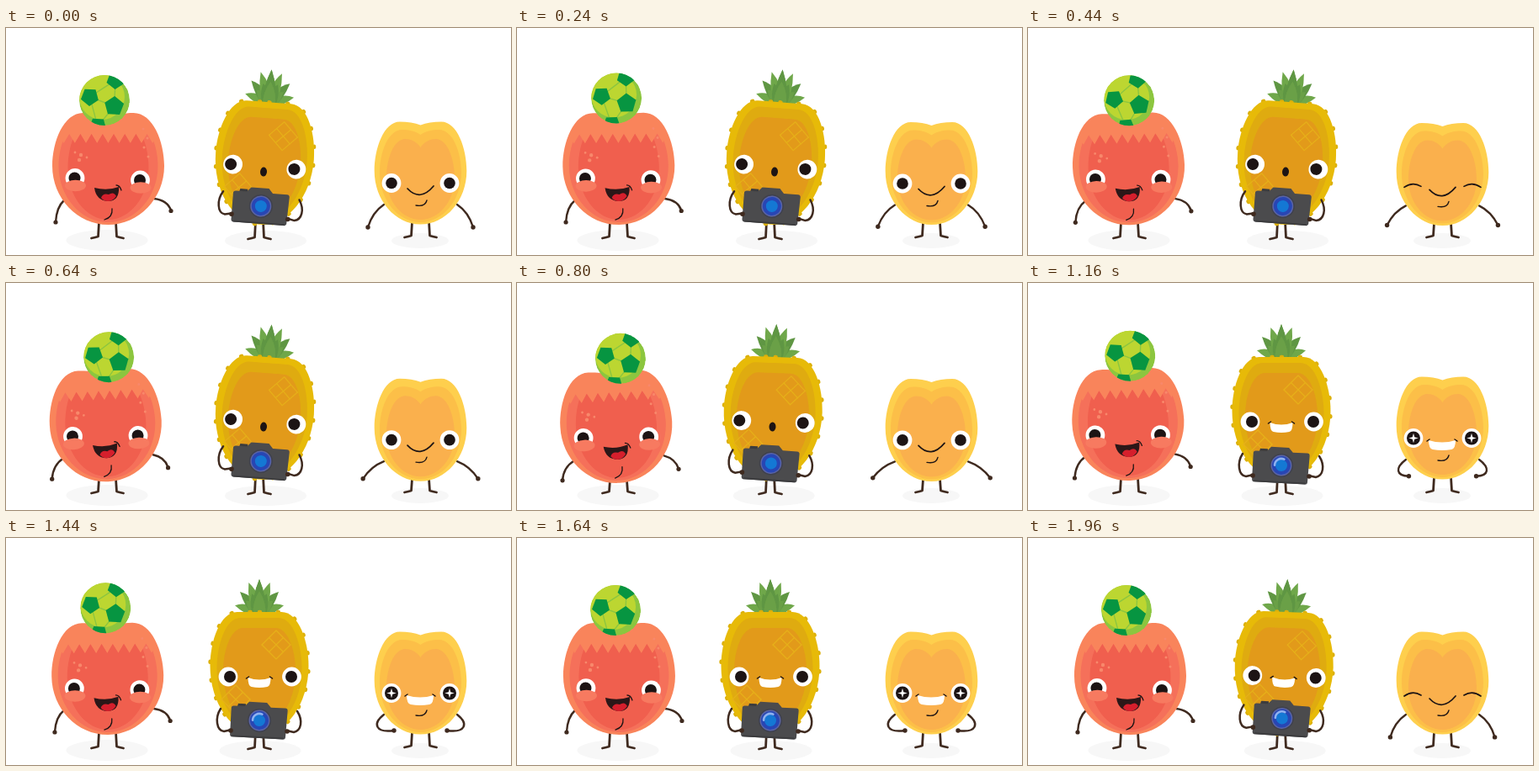
Animation of 600 by 270 pixels, one loop 2000 ms. Source, as an HTML page with a canvas:

```html
<!DOCTYPE html>
<html lang="en">
<head>
<meta charset="utf-8">
<title>Fruit friends</title>
<style>
html, body { margin: 0; width: 100%; height: 100%; overflow: hidden; background: #fff; }
canvas { display: block; width: 600px; height: 270px; }
</style>
</head>
<body>
<canvas id="stage"></canvas>
<script>
const LOOP = 2000, STEP = 40;
const canvas = document.getElementById('stage');
const ctx = canvas.getContext('2d');
const dpr = window.devicePixelRatio || 1;
canvas.width = 600 * dpr;
canvas.height = 270 * dpr;

const INK = '#1d1414', LIMB = '#3f2a1f', SHADE = '#f7f7f7';
const TAU = Math.PI * 2, DEG = Math.PI / 180;

// ---- motion helpers ----
const mix = (a, b, k) => a + (b - a) * k;
const part = (t, from, to) => Math.min(1, Math.max(0, (t - from) / (to - from)));
const ramp = (t, from, to) => { const u = part(t, from, to); return u * u * (3 - 2 * u); };
const bump = (t, from, to) => Math.sin(Math.PI * part(t, from, to)) ** 2;

// ---- drawing helpers ----
const shape = d => typeof d === 'string' ? new Path2D(d) : d;
function fill(d, color) {
  ctx.fillStyle = color;
  ctx.fill(shape(d));
}
function line(d, color, width) {
  ctx.strokeStyle = color;
  ctx.lineWidth = width;
  ctx.stroke(shape(d));
}
function oval(x, y, rx, ry, color) {
  ctx.fillStyle = color;
  ctx.beginPath();
  ctx.ellipse(x, y, rx, ry, 0, 0, TAU);
  ctx.fill();
}
function dot(x, y, r, color) { oval(x, y, r, r, color); }
function group(draw) {
  ctx.save();
  draw();
  ctx.restore();
}
function mirror(axis, draw) {
  draw();
  group(() => {
    ctx.translate(axis * 2, 0);
    ctx.scale(-1, 1);
    draw();
  });
}
function turn(x, y, deg) {
  ctx.translate(x, y);
  ctx.rotate(deg * DEG);
  ctx.translate(-x, -y);
}
function legs(cx, gap, top, foot) {
  mirror(cx, () => line(`M${cx + gap},${top}L${cx + gap + 1},${foot - 2}Q${cx + gap + 4},${foot - 1} ${cx + gap + 9},${foot}`, LIMB, 2.8));
}

// Symmetric fruit outline: two lobes on top, widest at height mid.
function fruit(cx, top, mid, bottom, w, dip) {
  const p = new Path2D(), low = mid + .55 * (bottom - mid), high = mid - .45 * (mid - top);
  const x = k => cx + w * k;
  p.moveTo(cx, top + dip);
  p.bezierCurveTo(x(.12), top + dip * .3, x(.28), top, x(.45), top);
  p.bezierCurveTo(x(.8), top, x(1), high, x(1), mid);
  p.bezierCurveTo(x(1), low, x(.55), bottom, cx, bottom);
  p.bezierCurveTo(x(-.55), bottom, x(-1), low, x(-1), mid);
  p.bezierCurveTo(x(-1), high, x(-.8), top, x(-.45), top);
  p.bezierCurveTo(x(-.28), top, x(-.12), top + dip * .3, cx, top + dip);
  return p;
}

function eye(x, y, look, r = 7) {
  dot(x, y, 11.4, '#fff');
  dot(x + look, y, r, INK);
}

function grin(x, y, w) {
  fill(`M${x - w},${y - 1}Q${x},${y + 4} ${x + w},${y - 1}Q${x + w},${y + 9} ${x + w * .7},${y + 10}Q${x},${y + 12} ${x - w * .7},${y + 10}Q${x - w},${y + 9} ${x - w},${y - 1}Z`, '#fff');
  mirror(x, () => line(`M${x - w - 2},${y}L${x - w + 1},${y - 2}`, INK, 1.5));
}

// ---- ball ----
function pentagon(x, y, r, angle) {
  const corner = i => [x + r * Math.cos(angle + i * TAU / 5), y + r * Math.sin(angle + i * TAU / 5)];
  fill('M' + [0, 1, 2, 3, 4].map(corner).join('L') + 'Z', '#079541');
}

function ball(x, y, spin) {
  group(() => {
    ctx.translate(x, y);
    ctx.beginPath();
    ctx.arc(0, 0, 30, 0, TAU);
    ctx.clip();
    dot(0, 0, 30, '#8cc63f');
    dot(-3, -4, 27, '#bcd631');
    ctx.rotate(spin * DEG);
    ctx.translate(11.5, 7);
    const ring = [0, 1, 2, 3, 4].map(i => 201 * DEG + i * TAU / 5);
    const at = (a, r) => [r * Math.cos(a), r * Math.sin(a)];
    ring.forEach(a => line(`M0,0L${at(a, 31)}L${at(a + TAU / 5, 31)}`, '#8cc63f', 1.4));
    pentagon(0, 0, 12, ring[0]);
    ring.forEach(a => pentagon(...at(a, 31), 11, a + Math.PI));
  });
}

// ---- peach ----
function peach(t) {
  const sway = bump(t, 0, 1700), drop = 4 * sway ** 4;
  const near = 59 - 5 * sway, far = 196 - 4 * sway;
  oval(120, 252.5, 48.5, 12.5, SHADE);
  legs(120.5, 10, 231 + drop, 250);

  line(`M${69 - sway},${205 + drop * 1.6}Q${near + 1},${213 + drop * 1.6} ${near},${231 + drop}`, LIMB, 2.4);
  dot(near, 231 + drop, 2.6, LIMB);
  line(`M${176 - 1.5 * sway},${203 + drop * .6}Q${far - 4},${205 + drop} ${far},${217 + drop}`, LIMB, 2.4);
  dot(far, 217.5 + drop, 2.6, LIMB);

  group(() => {
    ctx.translate(0, drop);
    turn(121, 235, -3 * sway);
    fill(fruit(121.5, 101, 164, 234, 66.5, 7), '#f9845b');
    group(() => {
      let teeth = 'M55,240';
      for (let i = 0; i <= 18; i++) teeth += `L${62 + i * 6.6},${i % 2 ? 137 : 126}`;
      ctx.clip(new Path2D(teeth + 'L190,240Z'));
      fill(fruit(121.5, 108, 164, 231, 59, 5), '#f5705a');
      fill(fruit(121.5, 112, 166, 228, 48, 5), '#f05f4e');
    });
    for (let i = 0; i < 4; i++) {
      dot(82 + (i * 7) % 16, 148 + i * 3, i % 2 ? 2.2 : 1.4, '#f8886b');
      dot(163 + (i * 5) % 9, 120 + i * 11, 1.5, '#f8886b');
    }
    eye(82, 178.5, -.5);
    eye(159.5, 181, -.5);
    oval(82.5, 187.5, 12.5, 6.8, '#f77a60');
    oval(160, 190, 12.5, 6.8, '#f77a60');
    fill('M105,190Q120,194 134,189Q135,206 121,206Q107,205 105,190Z', '#2b1718');
    fill('M113,202Q115,196 122,198Q128,194 131,200Q127,206 121,206Q116,206 113,202Z', '#d51f2c');
    line('M131,187Q135,187 137,193M126,215Q127,225 117,228', INK, 1.3);
  });

  const hop = 2.5 * bump(t, 0, 440) + 11 * bump(t, 1140, 1500);
  ball(117 + 6 * sway, 86 + drop - hop, -8 * bump(t, 0, 880));
}

// ---- pineapple ----
function leaf(deg, size, color) {
  const a = deg * DEG;
  const tip = [30 * size * Math.sin(a), -42 * size * Math.cos(a)];
  const nx = 9 * Math.cos(a), ny = 9 * Math.sin(a);
  const mx = tip[0] * .5, my = tip[1] * .5 - Math.abs(tip[0]) * .1;
  fill(`M-7,1Q${mx - nx},${my - ny} ${tip}Q${mx + nx},${my + ny} 7,1Z`, color);
}

function crown() {
  group(() => {
    ctx.translate(301, 91);
    for (let i = 3; i >= 0; i--) {
      leaf(-25 * i, 1, i % 2 ? '#6fa74a' : '#5f9643');
      leaf(25 * i, 1, i % 2 ? '#6fa74a' : '#5f9643');
    }
    for (let i = 2; i >= 0; i--) {
      leaf(-27 * i, .66, i % 2 ? '#5f9643' : '#6aa047');
      leaf(27 * i, .66, i % 2 ? '#5f9643' : '#6aa047');
    }
  });
}

function lattice(x, y) {
  group(() => {
    ctx.translate(x, y);
    ctx.rotate(Math.PI / 4);
    for (let i = -12; i <= 12; i += 12) line(`M${i},-12L${i},12M-12,${i}L12,${i}`, '#e6b019', 1.2);
  });
}

function camera(glint) {
  fill('M274,202L275,198L284,198L284,202Z', '#3c3c3e');
  fill('M270,201L283,201L288,195.5L309,195.5L314,201L331,201Q334,201 334,204L333,235Q333,238 330,238L270,238Q267,238 267,235L267,204Q267,201 270,201Z', '#4b4b4d');
  line('M270,237L330,237', '#3c3c3e', 2);
  dot(301, 217, 14, '#3f414d');
  dot(301, 217, 12.5, '#5a64a6');
  dot(301, 217, 11, '#2846b4');
  dot(301, 217, 7, '#1478d4');
  if (glint) line('M293,217A8,8 0 0 1 304,209.5', '#8fb2f0', 2.6);
}

function pineapple(t) {
  const lean = 1 - ramp(t, 680, 920) + ramp(t, 1880, 2040);
  const happy = t >= 880;
  oval(302 + 6.5 * lean, 253, 48.5, 12, SHADE);
  legs(301, 4.5, 230, 251);
  group(() => {
    turn(303, 235, 4.5 * lean);
    crown();
    const skin = fruit(301, 88, 152, 234, 58.5, 0);
    group(() => {
      ctx.setLineDash([1, 21]);
      line(skin, '#dcb00a', 4.5);
    });
    fill(skin, '#e7ba08');
    fill(fruit(301, 95, 155, 229, 50.5, 0), '#dfab10');
    fill(fruit(301, 107, 158, 225, 43, 0), '#e29a1a');
    lattice(321, 127);
    lattice(273, 192);
    eye(264, 165, happy ? 2 : -2.5);
    eye(339.5, 165, happy ? -.5 : -2.5);
    if (happy) grin(301, 167, 13.5);
    else oval(301, 171, 4, 5.5, INK);

    ctx.translate(0, -5 * lean);
    line('M255,203C248,214 250,229 259,230L268,228', LIMB, 2.5);
    line('M346,206C353,217 351,229 342,231L333,229', LIMB, 2.5);
    group(() => {
      turn(301, 217, 3 * (1 - lean));
      camera(happy);
    });
    dot(267, 229, 2.8, LIMB);
    dot(334, 230, 2.8, LIMB);
  });
}

// ---- apricot ----
function star(x, y, r) {
  const q = r * .22;
  let d = '';
  for (let i = 0; i < 8; i++) {
    const a = i * TAU / 8, l = i % 2 ? q * Math.SQRT2 : r;
    d += `${i ? 'L' : 'M'}${x + l * Math.cos(a)},${y + l * Math.sin(a)}`;
  }
  fill(d + 'Z', '#fff');
}

function apricot(t) {
  const drop = 2.4 * (ramp(t, 0, 800) - ramp(t, 1000, 1140));
  const raise = 1.1 * bump(t, 0, 1900);
  const hip = ramp(t, 980, 1240) - ramp(t, 1820, 1970);
  const starry = t >= 1080 && t < 1880;
  const shut = (t >= 400 && t < 520) || (t >= 1000 && t < 1080) || t >= 1880;
  oval(492, 253, 34, 9, SHADE);
  legs(492.5, 10, 231 + drop, 249);
  mirror(492.5, () => {
    const x = mix(430 - 7 * raise, 461, hip), y = mix(237 - 5 * raise, 229, hip);
    const c1 = [mix(440 - raise, 435, hip), mix(216, 221, hip)];
    const c2 = [mix(434 - 3 * raise, 439, hip), mix(224 - 3 * raise, 232, hip)];
    line(`M449,${210 + drop}C${c1} ${c2} ${x},${y}`, LIMB, 2.4);
    dot(x, y, 2.7, LIMB);
  });
  group(() => {
    ctx.translate(0, drop);
    fill(fruit(492.5, 111.5, 170, 233.5, 54.8, 4), '#fecf4d');
    fill(fruit(492.5, 121, 172, 231, 48.5, 6), '#fcbf48');
    fill(fruit(492.5, 132, 178, 228, 40.5, 10), '#fab04d');
    if (shut) {
      mirror(492.5, () => line('M447,188Q457,181 467,187', INK, 1.7));
    } else {
      [458, 527].forEach(x => {
        eye(x, 184.5, 0, starry ? 8 : 6.8);
        if (starry) star(x, 184.5, 5.8);
      });
    }
    if (starry) grin(492, 188, 16);
    else line('M477,191Q492,207 508,188', INK, 1.7);
    line('M487,211Q498,213 500,205', INK, 1.4);
  });
}

function frame(now) {
  const t = Math.floor((now % LOOP) / STEP) * STEP;
  ctx.setTransform(dpr, 0, 0, dpr, 0, 0);
  ctx.fillStyle = '#fff';
  ctx.fillRect(0, 0, 600, 270);
  ctx.lineCap = ctx.lineJoin = 'round';
  peach(t);
  pineapple(t);
  apricot(t);
}

const start = performance.now();
function tick() {
  frame(performance.now() - start);
  requestAnimationFrame(tick);
}
tick();
</script>
</body>
</html>
```
